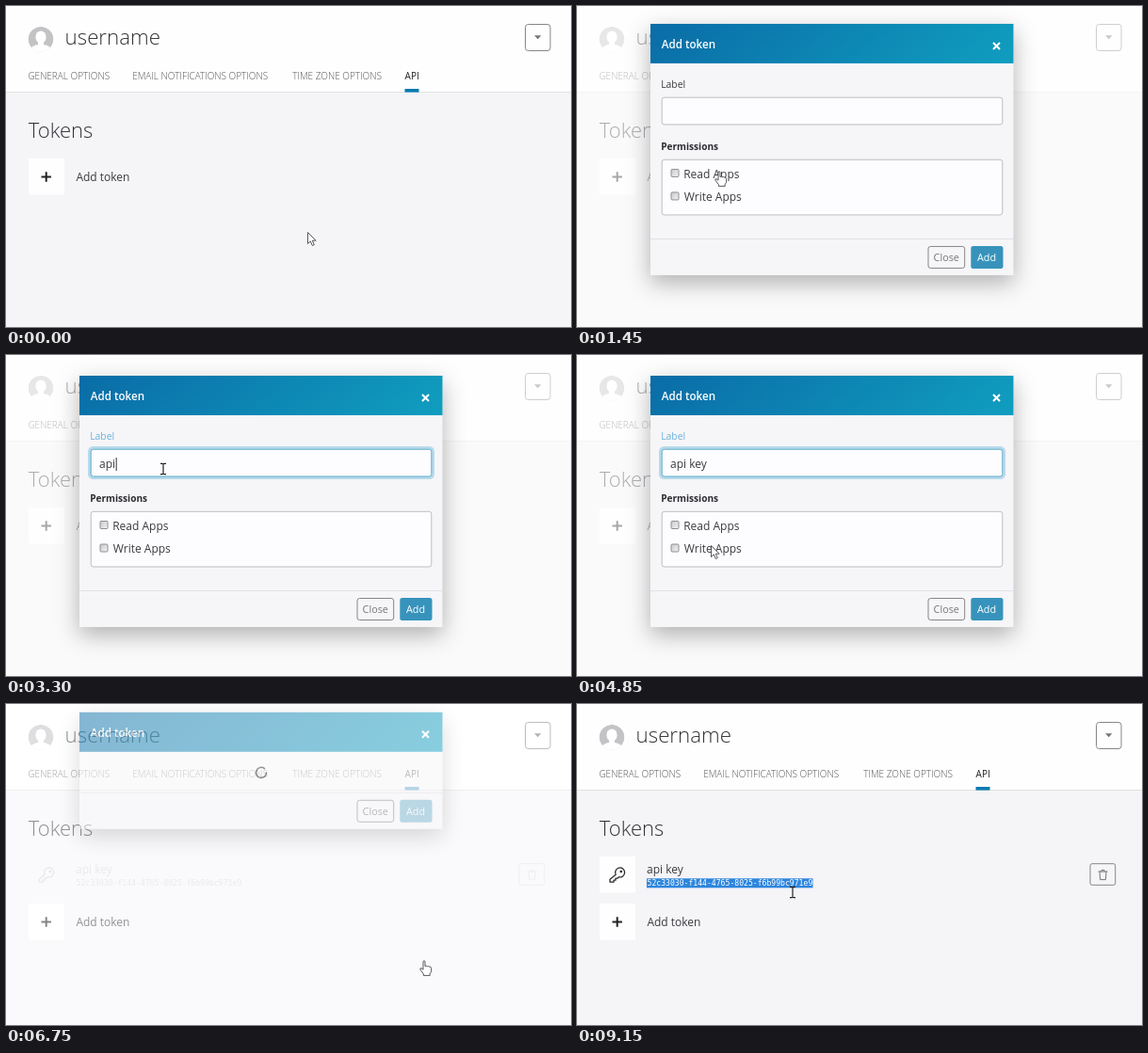
Animation, 600 px wide and 341 px high, one loop 10000 ms. Source, as an HTML page:

```html
<!DOCTYPE html>
<html lang="en">
<head>
<meta charset="utf-8">
<title>Add an API token</title>
<style>
html, body { margin: 0; width: 100%; height: 100%; overflow: hidden; background: #f5f4f7; }
svg { display: block; width: 100vw; height: 100vh; }
text { font: 12px "Open Sans", "Noto Sans", sans-serif; fill: #3b3b3f; white-space: pre; }
.big { font-size: 22px; font-weight: 300; fill: #333337; }
.tab { font-size: 10px; font-weight: 300; fill: #555; }
.small { font-size: 10.8px; }
.bold { font-weight: 700; font-size: 10.1px; fill: #2c2c30; }
.code { font: 8.12px "DejaVu Sans Mono", monospace; }
.line { fill: none; stroke: #2a2a2e; stroke-width: 1.3; stroke-linecap: round; stroke-linejoin: round; }
.btn { fill: none; stroke: #85858a; }
.box { fill: #fdfcfe; stroke: #bdbdc3; }
.pointer path { fill: #fff; stroke: #3c3c40; stroke-width: .85; stroke-linejoin: round; }
#ibeam path { fill: none; stroke: #222; stroke-width: 1.2; }
#panel { filter: drop-shadow(0 8px 12px rgba(0, 0, 0, .3)); }
</style>
</head>
<body>
<svg viewBox="0 0 600 341" preserveAspectRatio="none">
  <defs>
    <linearGradient id="blue" gradientUnits="userSpaceOnUse" x1="170" y1="-70" x2="372" y2="156">
      <stop offset="0" stop-color="#0a6ba6"/>
      <stop offset="1" stop-color="#109fc0"/>
    </linearGradient>
    <linearGradient id="grey" x2="1" y2="1">
      <stop offset="0" stop-color="#c9c9cd"/>
      <stop offset="1" stop-color="#f2f2f4"/>
    </linearGradient>
    <clipPath id="round"><circle cx="37" cy="35.3" r="13.4"/></clipPath>
  </defs>

  <rect width="600" height="341" fill="#f5f4f7"/>
  <rect width="600" height="91" fill="#fefefe"/>
  <rect y="91" width="600" height="1" fill="#e2e2e5"/>
  <g clip-path="url(#round)">
    <circle cx="37" cy="35.3" r="13.4" fill="#c3c3c6"/>
    <ellipse cx="37" cy="33" rx="5.6" ry="6.6" fill="#fff"/>
    <path d="M34 37h6v4q7 1 9 6v4H25v-4q2-5 9-6z" fill="#fff"/>
  </g>
  <text class="big" x="62.6" y="41.3" style="font-size:22.3px">username</text>
  <rect class="btn" x="551.5" y="19.5" width="26.5" height="28" rx="3"/>
  <path d="M561 31.3h7.4l-3.7 4z" fill="#77777b"/>
  <g id="tabs">
    <text class="tab" x="23.4" y="78">GENERAL OPTIONS</text>
    <text class="tab" x="134.2" y="78">EMAIL NOTIFICATIONS OPTIONS</text>
    <text class="tab" x="304.2" y="78">TIME ZONE OPTIONS</text>
    <text class="tab" x="423.6" y="78" style="fill:#222;font-weight:400">API</text>
  </g>
  <rect x="423.5" y="88" width="15" height="3.6" fill="#0a7ab0"/>
  <text class="big" x="23.8" y="140.2">Tokens</text>

  <g id="row">
    <rect x="24" y="162" width="38" height="38.5" fill="#fefefe"/>
    <g class="line">
      <path d="M41.2 181.3a5 5 0 1 1 3.2 2.5l-1.4 1.4h-2v2h-2v2h-4v-3z"/>
      <circle cx="46.8" cy="178" r=".7"/>
    </g>
    <text x="74" y="179.8">api key</text>
    <rect id="selection" x="74" y="185.3" width="176.5" height="10" fill="#2d86dd"/>
    <text id="code" class="code" x="74.5" y="193">52c33030-f144-4765-8025-f6b99bc971e9</text>
    <rect class="btn" x="545" y="169.7" width="26.7" height="22.6" rx="2"/>
    <path class="line" style="stroke:#77777b;stroke-width:1" d="M554 178h9M557 178v-1.6h3v1.6M555 178l.6 8.6h5.8l.6-8.6"/>
  </g>
  <g id="add">
    <rect x="24" y="162" width="38" height="38.5" fill="#fefefe"/>
    <path d="M37.5 181.5h10.4M42.7 176.3v10.4" stroke="#222226" stroke-width="2"/>
    <text x="74.4" y="185.8">Add token</text>
  </g>

  <rect id="veil" width="600" height="341" fill="#fff"/>

  <g id="modal">
    <rect id="panel" x="78" y="22" width="385.5" height="267" fill="#f6f5f8"/>
    <rect x="78" y="22" width="385.5" height="42" fill="url(#blue)"/>
    <text x="89.8" y="48.2" style="font-weight:600;font-size:11.6px;fill:#fff">Add token</text>
    <path d="M442 42l7 7M449 42l-7 7" stroke="#fff" stroke-width="2.1"/>
    <g id="form">
      <text id="label" x="89.2" y="90.3" style="font-size:10.4px">Label</text>
      <rect id="glow" x="88.5" y="98.5" width="365" height="32" rx="4" fill="none" stroke="#8cc8e2" stroke-width="3" stroke-opacity=".6"/>
      <rect id="field" class="box" x="90.2" y="100.2" width="361.6" height="28.8" rx="2.5"/>
      <text id="typed" x="99" y="119.8"></text>
      <rect id="caret" y="109" width="1" height="14" fill="#333"/>
      <text id="perms" class="bold" x="89.2" y="155.8">Permissions</text>
      <rect class="box" x="90.2" y="166.3" width="361.6" height="58.7" rx="2.5"/>
      <g fill="url(#grey)" stroke="#909096">
        <rect x="100" y="176.5" width="8" height="8" rx="1"/>
        <rect x="100" y="201" width="8" height="8" rx="1"/>
      </g>
      <path id="check" d="M101.6 205l1.9 2 3.2-4.4" fill="none" stroke="#222" stroke-width="1.7"/>
      <text x="113.2" y="185.6">Read Apps</text>
      <text x="113.8" y="210.2">Write Apps</text>
    </g>
    <path id="spinner" d="M0 -5.5A5.5 5.5 0 1 1 -4.2 -3.5" class="line" style="stroke-width:1.6"/>
    <g id="footer">
      <rect x="78" y="250" width="385.5" height="1" fill="#e2e1e6"/>
      <rect class="btn" x="373" y="258.5" width="38.7" height="23" rx="2.5"/>
      <text class="small" x="378.6" y="273.9" style="fill:#77777b">Close</text>
      <g id="submit">
        <rect id="face" x="418.3" y="258" width="34.2" height="24" rx="2.5"/>
        <text class="small" x="425" y="273.9" style="fill:#fff">Add</text>
      </g>
    </g>
  </g>

  <g id="arrow" class="pointer"><path d="M.5 .5v12l2.8-2.6 2 4.6 2-.9-2-4.4h3.8z"/></g>
  <g id="hand" class="pointer">
    <path d="M-1 .4q1-1.4 2 0V5.6l1.2-.5 1.2.7 1.3-.4 1 .8 1.3.1.6 1v4l-1.4 2.2v1.9H-.6v-1.6L-4 9.2q-.6-1.7 1-1.6l2 1.6z"/>
  </g>
  <g id="ibeam"><path d="M-3 -5.6h2L0 -5l1-.6h2M0 -5V5M-3 5.6h2L0 5l1 .6h2"/></g>
</svg>
<script>
const LOOP = 10000;
const el = {};
document.querySelectorAll("[id]").forEach(n => el[n.id] = n);

const clamp = u => Math.min(1, Math.max(0, u));
const smooth = u => u * u * (3 - 2 * u);
const easeOut = u => 1 - (1 - u) ** 1.9;
const span = (t, from, len) => clamp((t - from) / len);
const show = (node, on) => node.setAttribute("visibility", on ? "visible" : "hidden");
const fade = (node, o) => { node.setAttribute("opacity", o); show(node, o > 0); };
const move = (node, x, y, r = 0) =>
  node.setAttribute("transform", `translate(${x} ${y}) rotate(${r})`);
const last = (t, steps) => steps.filter(s => s[0] <= t).pop();

// time, x, y of the pointer's hot spot
const path = [
  [50, 320, 240], [400, 36, 177], [800, 36, 177], [1060, 56, 180],
  [1450, 151, 176], [1800, 184, 150], [1900, 184, 150], [2650, 167, 121],
  [4350, 167, 121], [4850, 142, 202], [5000, 105, 203], [5400, 105, 203],
  [6250, 442, 271], [6350, 444, 273], [7750, 444, 273], [8600, 229, 200]
];
const shapes = [
  [0, "arrow"], [330, "hand"], [1550, "arrow"], [2450, "ibeam"],
  [4480, "arrow"], [6180, "hand"], [7750, "arrow"], [8500, "ibeam"]
];
const typing = [
  [0, ""], [3050, "a"], [3150, "ap"], [3300, "api"], [3450, "api "],
  [3550, "api k"], [3700, "api ke"], [3950, "api key"]
];
const FOCUS = 2650, CHECK = 5150, OPEN = 1210, LOADING = 6500, CLOSE = 6675;

function pointAt(t) {
  const i = path.findIndex(p => p[0] > t);
  if (i === 0) return path[0].slice(1);
  if (i < 0) return path[path.length - 1].slice(1);
  const [a, b] = [path[i - 1], path[i]];
  const u = smooth((t - a[0]) / (b[0] - a[0]));
  return [1, 2].map(k => a[k] + (b[k] - a[k]) * u);
}

function drawPointer(t) {
  const [x, y] = pointAt(t), shape = last(t, shapes)[1];
  for (const name of ["arrow", "hand", "ibeam"]) show(el[name], name === shape);
  move(el[shape], x, y);
}

function drawForm(t, shown) {
  const focus = span(t, FOCUS, 150) - span(t, CHECK, 100);
  const [since, value] = last(t, typing);
  const blink = (t - Math.max(since, FOCUS)) % 1060 < 530;
  el.typed.textContent = value;
  el.caret.setAttribute("x", 99.6 + (value ? el.typed.getComputedTextLength() : 0));
  show(el.caret, shown && t >= FOCUS && t < CHECK && blink);
  fade(el.glow, shown ? focus : 0);
  el.field.style.stroke = focus > .5 ? "#5fabca" : "";
  el.label.style.fill = focus > .5 ? "#6cb2da" : "";
  el.perms.style.fill = t >= CHECK ? "#6cb2da" : "";
  show(el.check, shown && t >= CHECK);
}

function drawModal(t) {
  const loading = t >= LOADING;
  const alpha = span(t, OPEN, 150) - span(t, CLOSE, 150);
  const y = -67 * (1 - easeOut(span(t, OPEN, 300))) - 31 * easeOut(span(t, CLOSE, 300));
  const on = alpha > 0;
  el.modal.setAttribute("opacity", alpha);
  el.modal.setAttribute("display", on ? "inline" : "none");
  move(el.modal, 0, y);
  el.panel.setAttribute("height", loading ? 124 : 267);
  move(el.footer, 0, loading ? -143 : 0);
  show(el.form, !loading);
  show(el.spinner, loading);
  move(el.spinner, 271, 86, (t - LOADING) * .36);
  el.face.setAttribute("fill", t >= 6200 && !loading ? "#2a7199" : "#3793bb");
  el.submit.setAttribute("opacity", loading ? .65 : 1);
  drawForm(t, on && !loading);
}

function drawPage(t) {
  fade(el.veil, .6 * (span(t, 1060, 150) - span(t, CLOSE, 300)));
  fade(el.row, span(t, 6690, 400));
  move(el.add, 0, t >= CLOSE ? 50 : 0);
  const selected = t >= 8900;
  show(el.selection, selected);
  el.code.style.fill = selected ? "#fff" : "";
}

const start = performance.now();
function frame() {
  const t = (performance.now() - start) % LOOP;
  drawPage(t);
  drawModal(t);
  drawPointer(t);
  requestAnimationFrame(frame);
}
frame();
</script>
</body>
</html>
```
